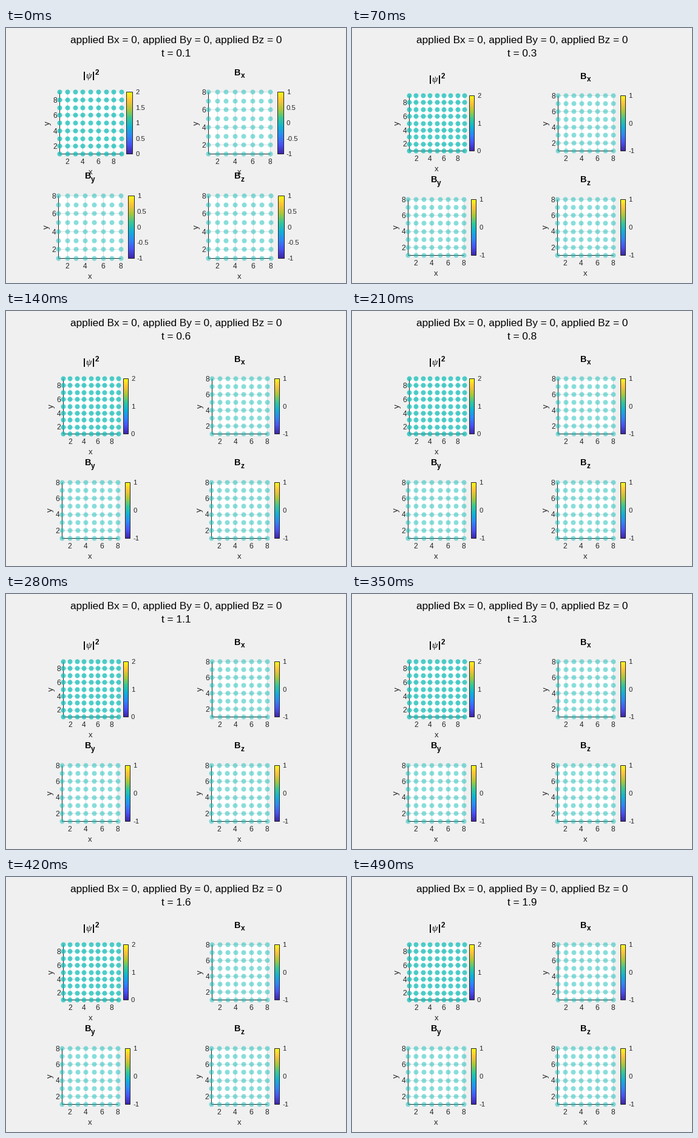
A matplotlib script for the animation above (0.56 s loop, 560x420 px).

```python
import math

import numpy as np
import matplotlib.pyplot as plt
from matplotlib.animation import FuncAnimation
from matplotlib.colors import LinearSegmentedColormap
from matplotlib.patches import Rectangle

W, H, DPI = 560, 420, 100
FRAMES, STEP = 8, 70
PX = 72 / DPI  # points per pixel
DARK, BACK, GRID, TEAL = "#262626", "#f0f0f0", "#dedede", "#12beb9"
PARULA = LinearSegmentedColormap.from_list("parula", [
    "#3e26a8", "#4852f4", "#2e87f7", "#12b1d6",
    "#37c897", "#abc739", "#fec338", "#f9fb15"])

plt.rcParams["font.family"] = "Liberation Sans"
plt.rcParams["axes.unicode_minus"] = False
fig = plt.figure(figsize=(W / DPI, H / DPI), dpi=DPI, facecolor=BACK)
ax = fig.add_axes([0, 0, 1, 1])


def text(x, y, s, size, ha="left", color="black", **kw):
    kw.setdefault("va", "baseline")
    ax.text(x, y, s, fontsize=size * PX, ha=ha, color=color, **kw)


def line(x, y, color):
    ax.plot(x, y, color=color, lw=PX, solid_capstyle="butt", zorder=1)


def panel_title(name, mid, top):
    if name == "psi":
        x, y = mid - 12.2, top - 21.5
        for dx in (0, 15):
            text(x + dx, y, "|", 14.2, weight="bold")
        text(x + 4, y, "ψ", 15, family="Liberation Serif", style="italic")
        text(x + 19, y - 6.5, "2", 11.7, weight="bold")
    else:
        x, y = mid - 8.3, top - 27.5
        text(x, y, "B", 14.4, weight="bold")
        text(x + 10.6, y + 4.3, name, 11.7, weight="bold")


def color_bar(left, width, top, side, low, step):
    ramp = np.linspace(0, 1, 256)[:, None]
    ax.imshow(ramp, cmap=PARULA, aspect="auto", origin="lower", zorder=1,
              extent=(left, left + width, top + side, top))
    ax.add_patch(Rectangle((left, top), width, side, fill=False,
                           ec=DARK, lw=PX, zorder=2))
    for v in np.arange(low, low + 2 + step / 2, step):
        y = top + side * (1 - (v - low) / 2)
        text(left + width + 5, y + 4.2, f"{v:g}", 11.4, color=DARK)


def panel(index, name, settled):
    row, col = divmod(index, 2)
    psi = name == "psi"
    n = 9 if psi else 8
    mid_x = 384.5 if col else 139.5 - 1.5 * row
    mid_y = 156.5 + 171.5 * row
    side = (91 if settled else 102) + row
    left, top = math.floor(mid_x - side / 2), math.floor(mid_y - side / 2)
    right, bottom = left + side, top + side
    xs = np.linspace(left, right, n)
    ys = np.linspace(bottom, top, n)

    ax.add_patch(Rectangle((left, top), side, side, fc="white", lw=0,
                           zorder=0))
    for i in range(1, n, 2):
        line([xs[i]] * 2, [top, bottom], GRID)
        line([left, right], [ys[i]] * 2, GRID)
        text(xs[i], bottom + 17.3, str(i + 1), 12, "center", DARK)
        text(left - 4, ys[i] + 4.8, str(i + 1), 12, "right", DARK)
    line([left, left], [top, bottom], DARK)
    line([left, right], [bottom, bottom], DARK)

    gx, gy = np.meshgrid(xs, ys)
    ax.scatter(gx.ravel(), gy.ravel(), s=(8 * PX) ** 2, color=TEAL,
               alpha=0.75 if psi else 0.5, linewidths=0, zorder=3)

    # the settled layout drops the label between the right-hand panels
    if not (settled and name == "x"):
        text(mid_x, bottom + 34, "x", 13.2, "center", DARK)
    text(left - 18.7, mid_y, "y", 13.2, "center", DARK,
         va="center", rotation=90)
    panel_title(name, mid_x, top)
    color_bar(right + (8 if psi else 12), 8 if settled else 10, top, side,
              0 if psi else -1, 1 if settled else 0.5)


def update(k):
    ax.clear()
    for index, name in enumerate(("psi", "x", "y", "z")):
        panel(index, name, k > 0)
    text(280, 25, "applied Bx = 0, applied By = 0, applied Bz = 0",
         17.22, "center")
    text(280, 47, f"t = {0.052 + 0.258 * k:.1f}", 17.22, "center")
    ax.set_xlim(0, W)
    ax.set_ylim(H, 0)
    ax.axis("off")
    return []


anim = FuncAnimation(fig, update, frames=FRAMES, interval=STEP,
                     repeat=True, repeat_delay=0, blit=False)
plt.show()
```
